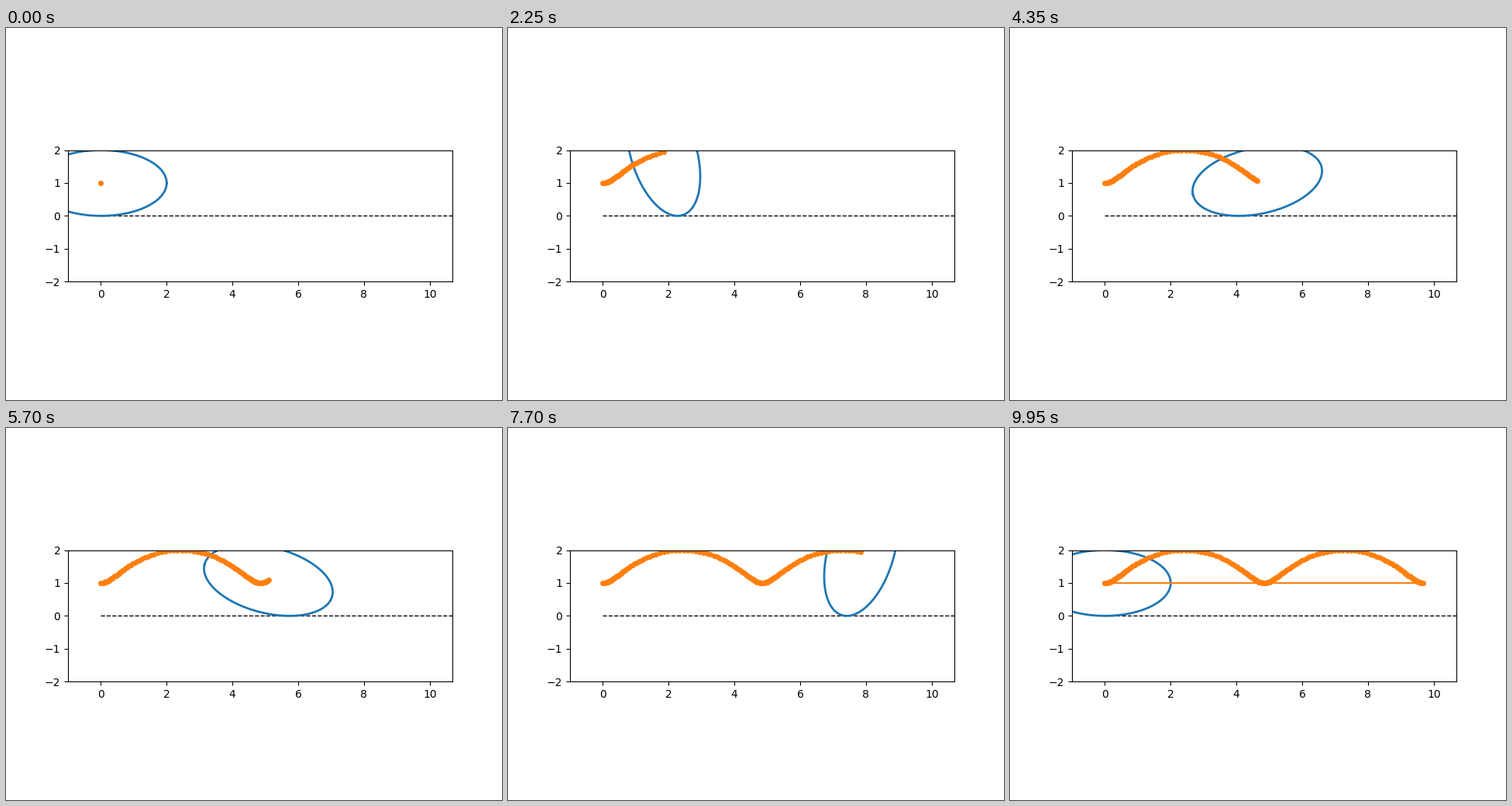
Recreate the animation shown at these times as a matplotlib script. Size 640 px wide and 480 px high, loop 10000 ms.

```python
import numpy as np
import matplotlib.pyplot as plt
from matplotlib.animation import FuncAnimation

A, B = 2.0, 1.0      # semi-axes of the rolling ellipse
FRAMES = 200


def speed(t):
    return np.hypot(A * np.cos(t), B * np.sin(t))


# Rolled distance is the arc length from the first contact point.
fine = np.linspace(0, 2 * np.pi, 20001)
v = speed(fine)
arc = np.concatenate([[0], np.cumsum((v[1:] + v[:-1]) / 2 * np.diff(fine))])
perimeter = arc[-1]

t = np.linspace(0, 2 * np.pi, FRAMES)
rolled = np.interp(t, fine, arc)
rolled[-1] = 0       # a full turn wraps back to the start

# Unit tangent at the contact point, and the centre above the ground.
cos_r, sin_r = A * np.cos(t) / speed(t), B * np.sin(t) / speed(t)
center_x = rolled - (A**2 - B**2) * np.sin(t) * np.cos(t) / speed(t)
center_y = A * B / speed(t)

outline = np.linspace(0, 2 * np.pi, 400)
body_x, body_y = A * np.cos(outline), B * np.sin(outline)

fig, ax = plt.subplots(figsize=(6.4, 4.8), dpi=100)
ax.set_aspect("equal")
ax.set_xlim(-1, perimeter + 1)
ax.set_ylim(-2, 2)

ax.plot([0, perimeter + 1], [0, 0], "k--", lw=1)
ellipse, = ax.plot([], [], color="tab:blue", lw=2)
trail, = ax.plot([], [], "o-", color="tab:orange", ms=4, lw=1.5)


def draw(i):
    c, s = cos_r[i], sin_r[i]
    ellipse.set_data(center_x[i] + body_x * c + body_y * s,
                     center_y[i] - body_x * s + body_y * c)
    trail.set_data(center_x[:i + 1], center_y[:i + 1])
    return ellipse, trail


anim = FuncAnimation(fig, draw, frames=FRAMES, interval=50,
                     init_func=lambda: draw(0), repeat=True, repeat_delay=0)
plt.show()
```
